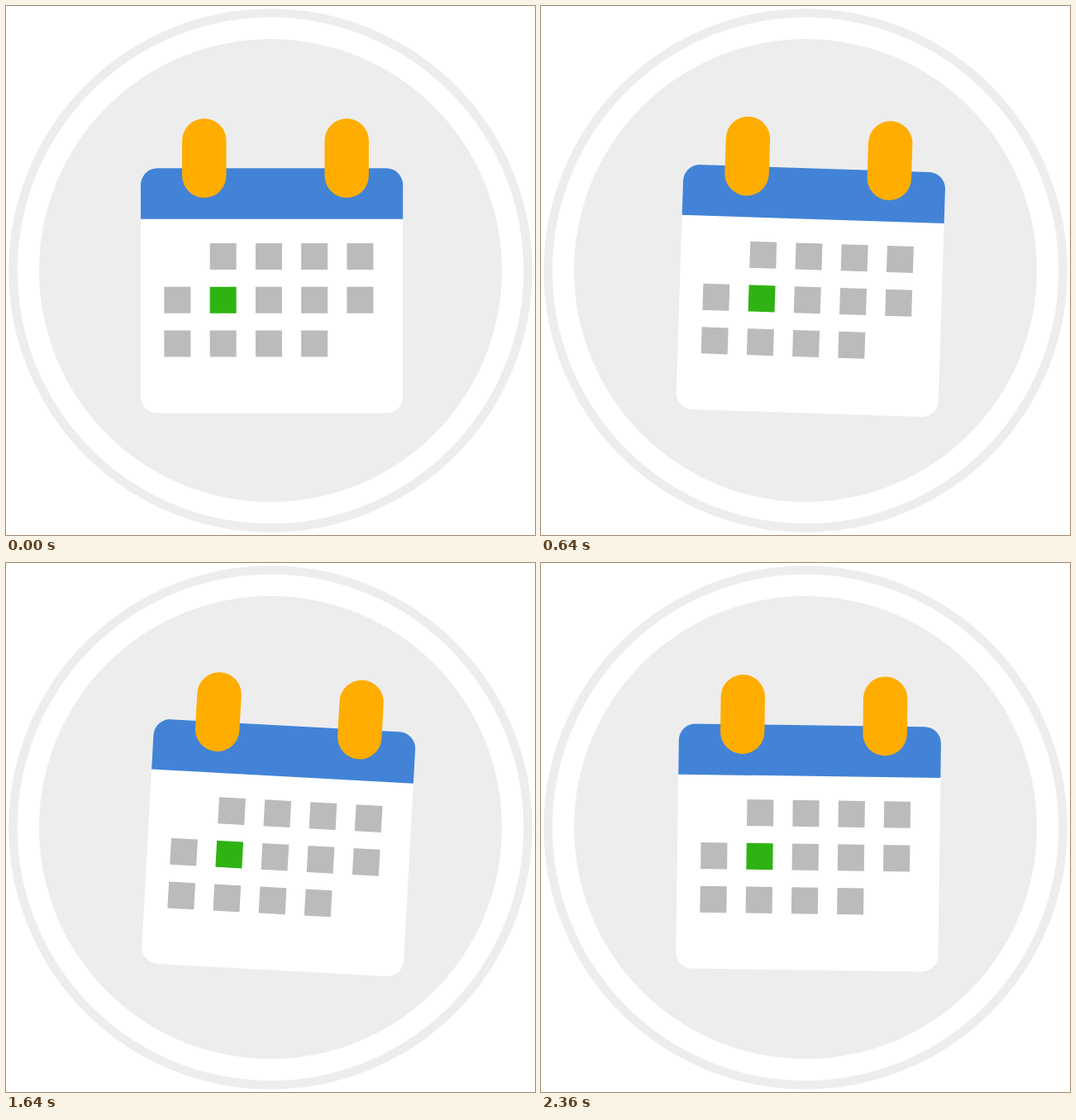
An HTML page that plays this animation: 640x640 px, repeating every 2430 ms.

```html
<!DOCTYPE html>
<html lang="en">
<head>
<meta charset="utf-8">
<title>Swinging calendar</title>
<style>
  html, body { margin: 0; width: 100%; height: 100%; overflow: hidden; background: #fff; }
  svg { display: block; width: 100%; height: 100%; }
</style>
</head>
<body>
<svg viewBox="0 0 640 640">
  <circle cx="320" cy="320" r="311.5" fill="none" stroke="#ededed" stroke-width="10.6"/>
  <circle cx="320" cy="320" r="280" fill="#ededed"/>
  <g id="calendar">
    <rect x="163" y="196.3" width="317.2" height="296.2" rx="20" fill="#fff"/>
    <path d="M163 257.8V216.3a20 20 0 0 1 20-20H460.2a20 20 0 0 1 20 20V257.8Z" fill="#4283d7"/>
    <g fill="#ffad00">
      <rect x="213.1" y="136.2" width="53.4" height="95.8" rx="26.7"/>
      <rect x="385.5" y="136.2" width="53.4" height="95.8" rx="26.7"/>
    </g>
    <g id="days"></g>
  </g>
</svg>
<script>
const LOOP = 2430, FPS = 14;
const calendar = document.getElementById('calendar');
const days = document.getElementById('days');

// Fourteen days: the first and the last cell of the 5 x 3 grid stay empty.
for (let i = 1; i < 14; i++) {
  const day = document.createElementNS(days.namespaceURI, 'rect');
  const attrs = {
    x: 191.4 + (i % 5) * 55.25,
    y: 287 + Math.floor(i / 5) * 52.75,
    width: 32,
    height: 32,
    fill: i === 6 ? '#2fb313' : '#bbb'
  };
  for (const name in attrs) day.setAttribute(name, attrs[name]);
  days.append(day);
}

// [step, degrees]: slow swings to the left, quick ones to the right
const swing = [
  [0, 0], [6.9, -10.1], [10.4, 9.8], [19.87, -5.2],
  [21.6, 4.72], [28.2, -2.68], [29.3, 3.4], [34.1, 0]
];

function angleAt(step) {
  const i = swing.findIndex(([end]) => end > step);
  const [s0, a0] = swing[i - 1], [s1, a1] = swing[i];
  return a0 + (a1 - a0) * (step - s0) / (s1 - s0);
}

function draw(now) {
  // Steps fall on whole hundredths of a second.
  const ticks = Math.floor((now % LOOP) / 10);
  const step = Math.floor((ticks + 0.5) * FPS / 100);
  calendar.setAttribute('transform', `rotate(${angleAt(step)} 321.6 492.5)`);
}

const start = performance.now();
function tick() {
  draw(performance.now() - start);
  requestAnimationFrame(tick);
}
tick();
</script>
</body>
</html>
```
